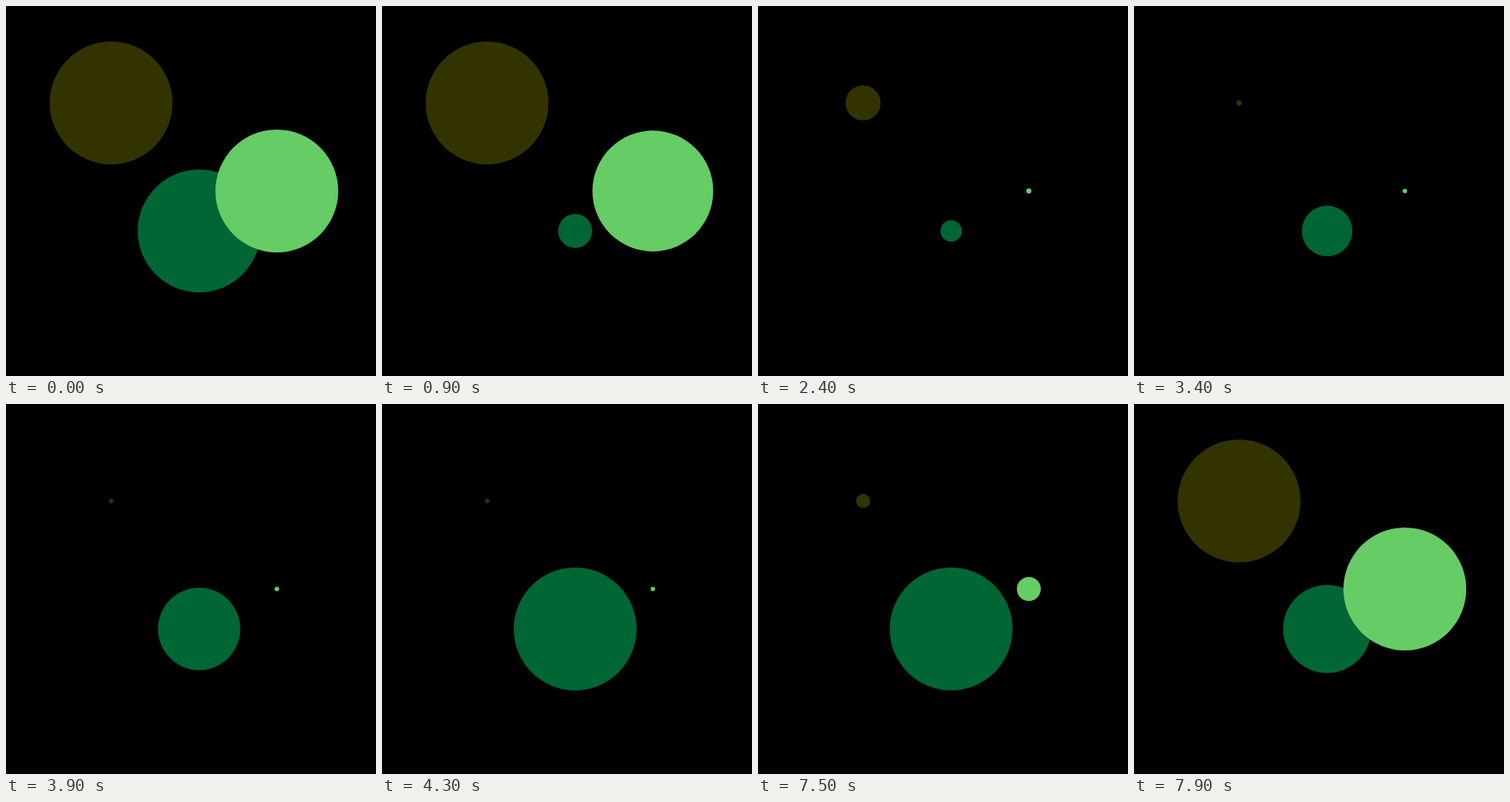
Recreate the animation shown at these times as an HTML page without scripts. Size 500 by 500 pixels, loop 8000 ms.

```html
<!DOCTYPE html>
<html lang="en">
<head>
<meta charset="utf-8">
<title>Pulsing circles</title>
<style>
  @property --t {
    syntax: "<number>";
    inherits: true;
    initial-value: 0;
  }

  html, body {
    margin: 0;
    width: 100%;
    height: 100%;
    overflow: hidden;
    background: #000;
  }

  /* --t counts ticks of 100 ms */
  svg {
    display: block;
    width: 100%;
    height: 100%;
    animation: tick 8s steps(80) -2ms infinite;
  }

  @keyframes tick {
    from { --t: 0; }
    to { --t: 80; }
  }

  /* exponential ease out from --shrink, exponential ease in up to --full */
  circle {
    --out: pow(2, (var(--shrink) - var(--t)) / 2);
    --in: pow(2, var(--t) - var(--full));
    r: min(83px, 3px + 80px * max(var(--out), var(--in)));
  }

  .olive {
    --shrink: 20.1;
    --full: 78.6;
    fill: #330;
  }

  .light {
    --shrink: 8.95;
    --full: 77.6;
    fill: #6c6;
  }

  /* slow growth, then a second shrink at the end of the loop */
  .green {
    --shrink: 5;
    --grow: pow(2, (var(--t) - 42.9) / 6.35);
    --again: pow(2, (78 - var(--t)) / 2);
    r: min(83px, max(3px + 80px * var(--out), 4.5px + 78.3px * var(--grow)), 3px + 80px * var(--again));
    fill: #063;
  }
</style>
</head>
<body>
<svg viewBox="0 0 500 500">
  <circle class="olive" cx="142" cy="131"/>
  <circle class="green" cx="261" cy="304"/>
  <circle class="light" cx="366" cy="250"/>
</svg>
</body>
</html>
```
